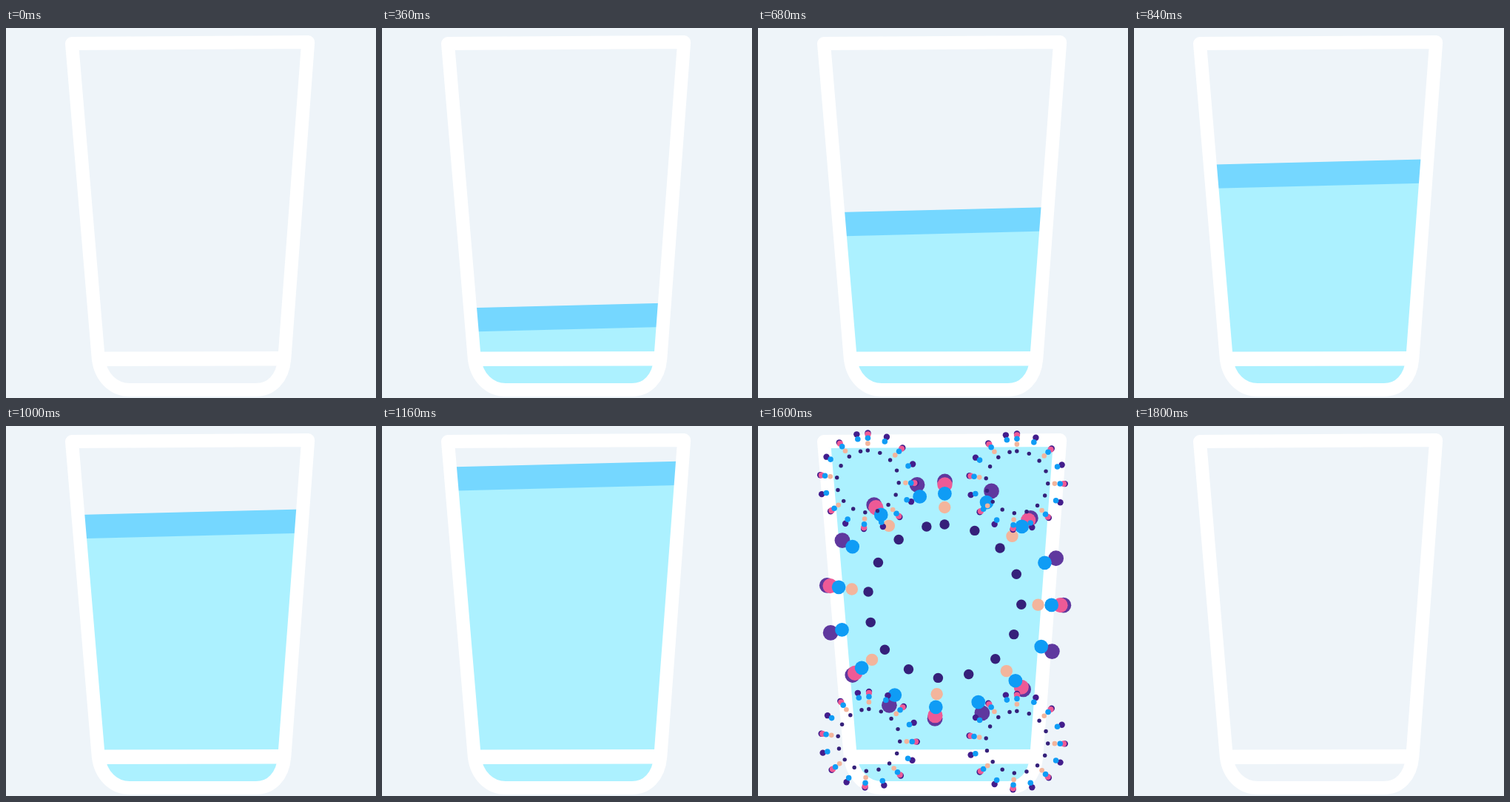
These frames come from a looping animation (500 by 500 pixels, 2.04 s). An HTML page with a canvas:

```html
<!DOCTYPE html>
<html lang="en">
<head>
<meta charset="utf-8">
<title>Filling glass</title>
<style>
  html, body { margin: 0; width: 100%; height: 100%; overflow: hidden; background: #eef4f9; }
  canvas { display: block; width: 500px; height: 500px; }
</style>
</head>
<body>
<canvas id="stage" width="500" height="500"></canvas>
<script>
const ctx = document.getElementById('stage').getContext('2d');

const LOOP = 2040, STEP = 40;
const BURST_START = 1202, BURST_END = 1720, EMPTY_AT = 1800;
const RING_TIME = 400, RING_DELAY = 40;
const RING_RADIUS = 160.5, DOT_RADIUS = 10.4, DOT_ANGLE = 23.1 * Math.PI / 180;

const glass = new Path2D(
  'M89 21 L124.8 447 C128 473 146 489 167 489 H338 C358 489 374 474 376.3 447 L408.2 19 Z');
const base = new Path2D('M125 447.2 L376 446.7');

// Outermost ring first; every second ring has half as many dots.
const rings = [
  { dots: 16, color: '#5f389e' },
  { dots: 8, color: '#ee5a96' },
  { dots: 16, color: '#0f9cf5' },
  { dots: 8, color: '#f3b59c' },
  { dots: 16, color: '#35207a' }
];

const bursts = [
  { x: 251.3, y: 239.5, size: 1 },
  { x: 148, y: 76, size: 0.404, outer: '#431d8c' },
  { x: 349.5, y: 77, size: 0.404, outer: '#431d8c' },
  { x: 149.5, y: 425.5, size: 0.404, outer: '#431d8c' },
  { x: 349.5, y: 428.3, size: 0.404, outer: '#431d8c' }
];

const easeInOut = u => (1 - Math.cos(Math.PI * u)) / 2;

function fillBelow(y, color) {
  ctx.fillStyle = color;
  ctx.beginPath();
  ctx.moveTo(0, y + 6.2);
  ctx.lineTo(500, y - 6.2);
  ctx.lineTo(500, 500);
  ctx.lineTo(0, 500);
  ctx.fill();
}

function drawWater(time) {
  const level = 520.6 - 0.4044 * time;
  ctx.save();
  ctx.clip(glass);
  fillBelow(level, '#75d7ff');
  fillBelow(level + 32.3, '#acf1ff');
  ctx.restore();
}

function drawGlass() {
  ctx.strokeStyle = '#fff';
  ctx.lineJoin = 'round';
  ctx.lineWidth = 18;
  ctx.stroke(glass);
  ctx.lineWidth = 19.5;
  ctx.stroke(base);
}

function drawRing(dots, color) {
  const spacing = DOT_ANGLE * 16 / dots;
  ctx.fillStyle = color;
  for (let i = 0; i < dots; i++) {
    const x = 1.2 + RING_RADIUS * Math.sin(i * spacing);
    const y = -4 - RING_RADIUS * Math.cos(i * spacing);
    ctx.beginPath();
    ctx.arc(x, y, DOT_RADIUS, 0, 2 * Math.PI);
    ctx.fill();
  }
}

function drawBurst({ x, y, size, outer }, age) {
  rings.forEach(({ dots, color }, i) => {
    const progress = Math.min((age - i * RING_DELAY) / RING_TIME, 1);
    if (progress <= 0) return;
    const scale = size * easeInOut(progress);
    ctx.save();
    ctx.translate(x, y);
    ctx.scale(scale, scale);
    drawRing(dots, i === 0 && outer || color);
    ctx.restore();
  });
}

function draw(time) {
  ctx.fillStyle = '#eef4f9';
  ctx.fillRect(0, 0, 500, 500);
  if (time < EMPTY_AT) drawWater(time);
  drawGlass();
  if (time < BURST_END) bursts.forEach(burst => drawBurst(burst, time - BURST_START));
}

const start = performance.now();
function tick() {
  const time = (performance.now() - start) % LOOP;
  draw(Math.floor(time / STEP) * STEP);
  requestAnimationFrame(tick);
}
tick();
</script>
</body>
</html>
```
